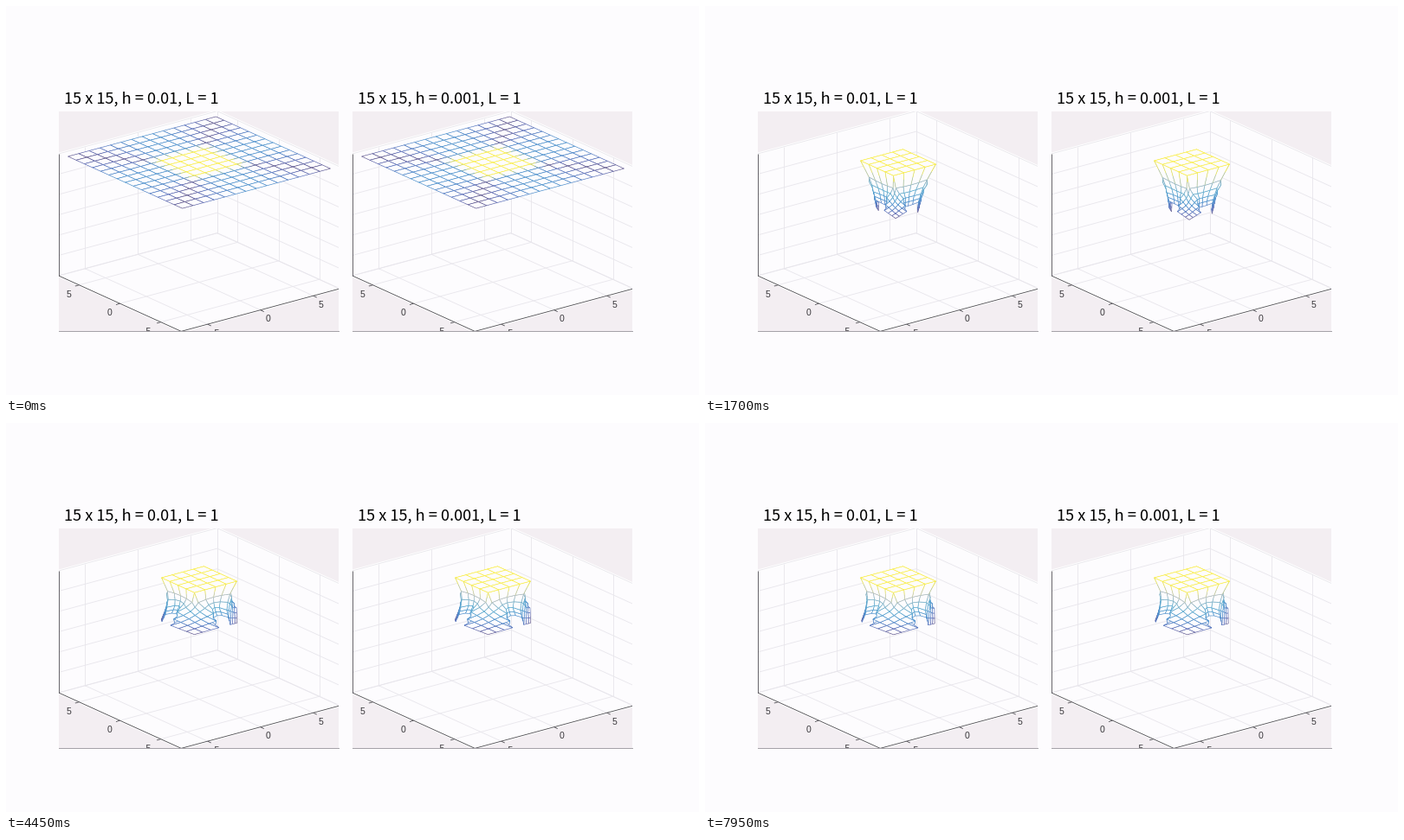
Recreate the animation shown at these times as a matplotlib script. Size 800 by 450 pixels, loop 8 s.

```python
import numpy as np
import matplotlib.pyplot as plt
from matplotlib.animation import FuncAnimation
from matplotlib.collections import LineCollection, PolyCollection
from matplotlib.patches import Polygon, Rectangle

W, H, DPI = 800, 450, 100
FRAMES, STEP = 160, 50
PAGE, PANEL, GRID, DARK = "#fdfcfe", "#f3eef2", "#e8e6ec", "#4c4a50"
LIM, TOP, FLOOR = 7.5, -2.5, 138.5      # box half width, drops of lid and floor in px
SHIFT, LAG = 339, .04                   # second panel: offset in px, delay in s

RAMP_AT = [0, .12, .3, .5, .75, .9, 1]
RAMP = np.array([[88, 76, 130], [84, 102, 182], [64, 136, 202], [78, 166, 205],
                 [184, 188, 184], [225, 211, 160], [250, 238, 60]]) / 255


def project(x, y, drop):
    return np.stack([223 + 12.2 * x + 9.43 * y,
                     181 - 3.29 * x + 4.29 * y + drop], axis=-1)


def fall(t):
    """Damped bounce from 0 (flat) to 1 (hanging)."""
    t, omega, tau = max(t - .14, 0), 2.793, 1.1
    wave = np.cos(omega * t) + np.sin(omega * t) / (omega * tau)
    return max(1 - np.exp(-t / tau) * wave, .001)


def swing(t):
    """1 while spread out, 0 at rest, below 0 while swung in under the table."""
    x = np.clip((t - .45) / 1.05, 0, 1)
    late = max(t - 1.35, 0)
    sway = .26 * np.exp(-late / 1.2) * np.sin(2 * np.pi * late / 1.9)
    return 1 - x * x * (3 - 2 * x) - sway


# Node indices: the middle 5 x 5 nodes are pinned
I, J = np.meshgrid(np.arange(-7, 8), np.arange(-7, 8), indexing="ij")
A, B = np.maximum(abs(I) - 2, 0), np.maximum(abs(J) - 2, 0)
GAP, FAR = A - B, np.maximum(A, B)
MIX = np.minimum(A, B) / np.maximum(FAR, 1)
MI, MJ = np.minimum(abs(I), 2) / 2, np.minimum(abs(J), 2) / 2
U = FAR / 5
BUMP = np.sin(np.pi * U ** .6)


def cloth(t):
    d, s = fall(t), swing(t)
    gather, hang = max(-s, 0), np.clip(1 - s, 0, 1)

    def reach(start, rest, flat):
        return start + (rest + (flat - rest) * s - start) * U

    # Corner patches: x + y and x - y of each node
    pinch = .6 * min(d, 1) * BUMP
    rim, tip = reach(4, 3.3, 9), reach(4, 3.9, 14)
    total = rim + (tip - rim) * MIX - pinch
    bent = np.minimum(abs(GAP), 3) + np.maximum(abs(GAP) - 3, 0) * (1 - 1.5 * hang)
    spread = (.86 + .14 * max(s, 0)) * (1 - 3 * gather)
    diff = spread * np.maximum(U, .2) ** (.6 * hang) * np.sign(GAP) * bent
    px, py = (total + diff) / 2, (total - diff) / 2

    # Side strips bend between two patches
    mid = reach(2, 2.1, 7) - pinch / 2
    x = np.where(A > 0, mid + (px - mid) * MJ ** 2, px * MI)
    y = np.where(B > 0, mid + (py - mid) * MI ** 2, py * MJ)

    depth = d * np.where(FAR > 0, np.maximum(U, .2) ** (.58 * (1 - np.exp(-t / .7))), 0)
    mid_d, side_d = 33 * (1 + gather), 36 + 13 * MIX
    drop = depth * (mid_d + (side_d - mid_d) * (MI * MJ) ** 2)
    return x * np.sign(I), y * np.sign(J), drop


def quads(grid):
    """Corners of all cells, shape (cells, 4, ...)."""
    q = np.stack([grid[:-1, :-1], grid[1:, :-1], grid[1:, 1:], grid[:-1, 1:]], axis=2)
    return q.reshape((-1, 4) + grid.shape[2:])


def colours(drop):
    v = 1 - drop / drop.max()
    return np.stack([np.interp(v, RAMP_AT, RAMP[:, c]) for c in range(3)], axis=-1)


def mesh_parts(t, dx):
    """Painter-sorted faces, each followed by its edges in two tones."""
    x, y, drop = cloth(t)
    near = (-3.29 * x + 4.29 * y) / 5.4 * .937 - drop / 4.7 * .35
    order = np.argsort(quads(near).mean(axis=1), kind="stable")
    p = quads(project(x, y, drop) + [dx, 0])[order]
    c = quads(colours(drop))[order]
    p2, c2 = np.roll(p, -1, axis=1), np.roll(c, -1, axis=1)
    half = (p + p2) / 2
    n = len(p)

    verts = np.empty((n, 9, 4, 2))
    edge = np.ones((n, 9, 4))
    verts[:, 0] = p
    edge[:, 0, 3] = 0
    verts[:, 1:5] = np.stack([p, half, half, p], axis=2)
    verts[:, 5:9] = np.stack([half, p2, p2, half], axis=2)
    edge[:, 1:5, :3] = .75 * c + .25 * c2
    edge[:, 5:9, :3] = .25 * c + .75 * c2
    return verts.reshape(-1, 4, 2), edge.reshape(-1, 4)


fig = plt.figure(figsize=(W / DPI, H / DPI), dpi=DPI, facecolor=PAGE)
ax = fig.add_axes([0, 0, 1, 1])
ax.set_xlim(0, W)
ax.set_ylim(H, 0)
ax.axis("off")


def panel(dx, title):
    frame = Rectangle((61 + dx, 122), 323, 254, fc=PANEL, ec="none", zorder=0)
    ax.add_patch(frame)

    def at(x, y, drop):
        return project(x, y, drop) + [dx, 0]

    def lines(segs, color, width):
        lc = LineCollection(segs, colors=color, linewidths=width, zorder=2)
        ax.add_collection(lc)
        lc.set_clip_path(frame)

    def label(pos, text):
        txt = ax.text(*pos, text, family="Liberation Sans", size=7.6, color="#3a383c",
                      ha="center", va="center_baseline", zorder=3, clip_on=True)
        txt.set_clip_path(frame)

    box = Polygon([at(-LIM, -LIM, TOP), at(LIM, -LIM, TOP), at(LIM, LIM, TOP),
                   at(LIM, LIM, FLOOR), at(-LIM, LIM, FLOOR), at(-LIM, -LIM, FLOOR)],
                  fc=PAGE, ec="white", lw=2, zorder=1)
    ax.add_patch(box)
    box.set_clip_path(frame)

    grid = []
    for v in (-5, 0, 5, LIM):
        grid += [[at(v, -LIM, TOP), at(v, -LIM, FLOOR)],
                 [at(v, -LIM, FLOOR), at(v, LIM, FLOOR)],
                 [at(LIM, -v, TOP), at(LIM, -v, FLOOR)],
                 [at(-LIM, -v, FLOOR), at(LIM, -v, FLOOR)]]
    for d in np.linspace(TOP, FLOOR, 7):
        grid += [[at(-LIM, -LIM, d), at(LIM, -LIM, d)],
                 [at(LIM, -LIM, d), at(LIM, LIM, d)]]
    lines(grid, GRID, .6)

    front, left = at(-LIM, LIM, FLOOR), at(-LIM, -LIM, FLOOR)
    axes = [[at(-LIM, -LIM, TOP) + [.5, 0], left + [.5, 0]],
            [left, front], [front, at(LIM, LIM, FLOOR)]]
    for v in (-5, 0, 5):
        a, b = at(-LIM, -v, FLOOR), at(v, LIM, FLOOR)
        axes += [[a, a + [-4.5, 1.3]], [b, b + [4, 1.9]]]
        # The left axis counts up away from the viewer
        a_new = at(-LIM, -v, FLOOR)
        label(a_new + [-15 if v < 0 else -12, 10], str(v))
        label(b + [9.2, 9.5], str(v))
    lines(axes, DARK, .6)
    ax.plot([61 + dx, 384 + dx], [375.7, 375.7], color="#a3a0a6", lw=.7, zorder=3)
    ax.text(67 + dx, 113, title, family="Noto Sans CJK JP", size=13.1,
            color="black", va="baseline", zorder=3)


panel(0, "15 x 15, h = 0.01, L = 1")
panel(SHIFT, "15 x 15, h = 0.001, L = 1")

meshes = []
for dx, lag in ((0, 0), (SHIFT, LAG)):
    mesh = PolyCollection(np.zeros((1, 4, 2)), facecolors=PAGE, linewidths=.46, zorder=4)
    ax.add_collection(mesh, autolim=False)
    meshes.append((mesh, dx, lag))


def draw(frame):
    for mesh, dx, lag in meshes:
        t = max(frame * STEP / 1000 - lag, 0)
        verts, edge = mesh_parts(t, dx)
        mesh.set_verts(verts)
        mesh.set_edgecolor(edge)
    return [m[0] for m in meshes]


anim = FuncAnimation(fig, draw, frames=FRAMES, interval=STEP, repeat=True,
                     repeat_delay=0, blit=False)
plt.show()
```
